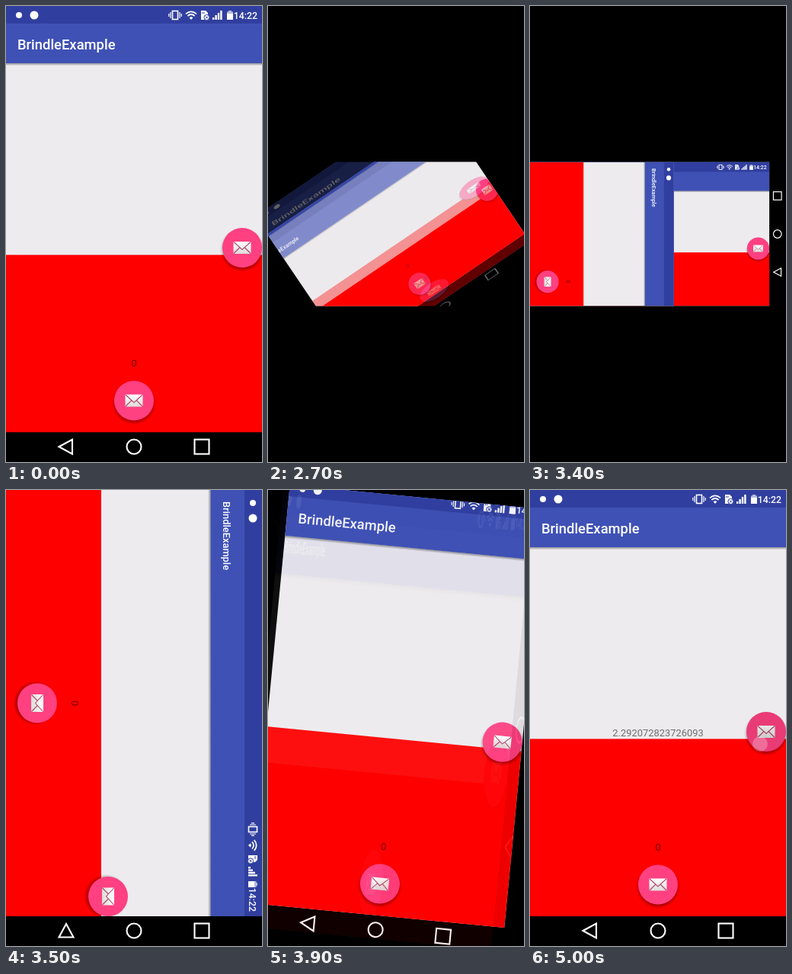
An HTML page that plays this animation: 336x598 px, repeating every 5.1 s.

```html
<!DOCTYPE html>
<html lang="en">
<head>
<meta charset="utf-8">
<title>Screen rotation</title>
<style>
  html, body { margin: 0; width: 100%; height: 100%; overflow: hidden; background: #000; }
  svg { display: block; width: 336px; height: 598px; }
  text { font-family: Roboto, "Noto Sans", sans-serif; }
  .title { font-weight: 500; fill: #fff; }
  .clock { font-weight: 500; font-size: 12.3px; fill: #fff; text-anchor: end; }
  .value { font-size: 12.9px; fill: #000; fill-opacity: .54; text-anchor: middle; }
  .line { fill: none; stroke: #fff; stroke-width: 2.1; }
</style>
</head>
<body>
<svg viewBox="0 0 336 598">
  <defs>
    <clipPath id="window"><rect id="frame" width="336" height="598"/></clipPath>
    <clipPath id="square"><rect width="336" height="336"/></clipPath>
    <clipPath id="hole"><rect id="opening" width="336" height="598"/></clipPath>
    <linearGradient id="edge" x2="0" y2="1">
      <stop stop-opacity=".38"/>
      <stop offset="1" stop-opacity="0"/>
    </linearGradient>
    <radialGradient id="shade">
      <stop offset=".78" stop-opacity=".4"/>
      <stop offset="1" stop-opacity="0"/>
    </radialGradient>
    <linearGradient id="paper" x2="0" y2="1">
      <stop stop-color="#fff"/>
      <stop offset="1" stop-color="#dedbd8"/>
    </linearGradient>

    <g id="fab">
      <circle cy="2.5" r="29" fill="url(#shade)"/>
      <circle r="26" fill="#ff4081"/>
      <rect x="-11.5" y="-8" width="23" height="16" rx="1" fill="url(#paper)"/>
      <path d="M-11-7.5 0 2.5 11-7.5M-11 7.5-3.5 0M11 7.5 3.5 0" fill="none" stroke="#b0486e" stroke-width="1.1"/>
    </g>

    <path id="back" class="line" d="M-9 0 8.5-9.5V9.5Z"/>
    <circle id="home" class="line" r="9.5"/>
    <rect id="recent" class="line" x="-9.5" y="-9.5" width="19" height="19"/>

    <g id="notices" fill="#fff">
      <circle cx="17" cy="12" r="4"/>
      <circle cx="37" cy="12" r="5.5"/>
    </g>

    <g id="system" fill="#fff">
      <rect x="218.5" y="6.5" width="7" height="11" fill="none" stroke="#fff" stroke-width="1.6"/>
      <path d="M216 8v8M213.8 10v4M228 8v8M230.2 10v4" stroke="#fff" stroke-width="1.2"/>
      <g fill="none" stroke="#fff" stroke-width="1.7">
        <path d="M236 10.3q7-6 14 0M238.4 13q4.6-4 9.2 0"/>
      </g>
      <path d="M240.6 15.2q2.4-2 4.8 0L243 18Z"/>
      <path d="M256 6h6l3 3v9h-9Z"/>
      <circle cx="263.5" cy="15" r="3.6" stroke="#303f9f"/>
      <path d="M262 13.5l3 3m0-3l-3 3M258 8v2m2-2v2" stroke="#303f9f"/>
      <path d="M271 18v-3h2.4v3ZM274.4 18v-6h2.4v6ZM277.8 18V9h2.4v9ZM281.2 18V6h2.4v12Z"/>
      <path d="M290 7.5h2V6h4v1.5h2V18h-8Z" fill-opacity=".65"/>
      <path d="M290 10h8v8h-8Z"/>
      <text class="clock" x="330" y="16.6">14:22</text>
    </g>

    <g id="portrait">
      <rect width="336" height="598"/>
      <rect width="336" height="559" fill="#edebee"/>
      <rect y="326.4" width="336" height="232.6" fill="#f00"/>
      <rect width="336" height="75" fill="#3f51b5"/>
      <rect width="336" height="23" fill="#303f9f"/>
      <rect y="75" width="336" height="3.5" fill="url(#edge)"/>
      <use href="#notices"/>
      <use href="#system"/>
      <text class="title" x="15" y="57" font-size="18.4">BrindleExample</text>
      <text class="value" x="168" y="473">0</text>
      <use href="#fab" x="310" y="317"/>
      <use href="#fab" x="168" y="517.5"/>
      <use href="#back" x="78.5" y="578"/>
      <use href="#home" x="168" y="578"/>
      <use href="#recent" x="257" y="578"/>
    </g>

    <g id="landscape">
      <rect width="598" height="336"/>
      <rect width="559" height="336" fill="#edebee"/>
      <rect y="211" width="559" height="125" fill="#f00"/>
      <rect width="559" height="67.5" fill="#3f51b5"/>
      <rect width="559" height="23" fill="#303f9f"/>
      <rect y="67.5" width="559" height="3.5" fill="url(#edge)"/>
      <use href="#notices"/>
      <use href="#system" x="223"/>
      <text class="title" x="15" y="51.5" font-size="12.9">BrindleExample</text>
      <text class="value" x="279.5" y="250">0</text>
      <use href="#fab" x="533" y="202"/>
      <use href="#fab" x="279.5" y="295"/>
      <use href="#recent" x="578" y="79"/>
      <use href="#home" x="578" y="168"/>
      <use href="#back" x="578" y="257"/>
    </g>
  </defs>

  <rect width="336" height="598"/>
  <g id="view" clip-path="url(#window)">
    <g id="inside"><use id="screen" href="#portrait"/></g>
    <g id="cover"><use id="shot" href="#landscape"/></g>
  </g>
  <g id="tap">
    <circle id="press" cx="310" cy="317" r="26"/>
    <circle id="touch" cx="302" cy="333" r="10" fill="#fff"/>
    <text id="result" class="value" x="168" y="322.5">2.292072823726093</text>
  </g>
</svg>
<script>
const LOOP = 5100, STEP = 100, SPIN = 441;
const FIT = 336 / 598;
const modes = {
  portrait: { w: 336, h: 598, project: 'translate(0 0)' },
  landscape: { w: 598, h: 336, project: `translate(0 ${(598 - 336 * FIT) / 2}) scale(${FIT})` }
};
const $ = id => document.getElementById(id);
const set = (id, attrs) => {
  for (const key in attrs) $(id).setAttribute(key, attrs[key]);
};
const clamp = x => Math.min(1, Math.max(0, x));

// cubic-bezier(.4, 0, .2, 1)
function ease(x) {
  if (x <= 0) return 0;
  if (x >= 1) return 1;
  let lo = 0, hi = 1;
  for (let i = 0; i < 24; i++) {
    const s = (lo + hi) / 2, r = 1 - s;
    if (1.2 * s * r * r + .6 * s * s * r + s * s * s < x) lo = s; else hi = s;
  }
  return lo * lo * (3 - 2 * lo);
}

// Places a screen on the centre of a display, turned and stretched.
function place(display, screen, angle, sx = 1, sy = 1) {
  return `translate(${display.w / 2} ${display.h / 2}) rotate(${angle}) ` +
    `scale(${sx} ${sy}) translate(${-screen.w / 2} ${-screen.h / 2})`;
}

// The previous screen fades out over the next one while both turn upright.
// The next one shows only inside the outline of the previous one.
function rotate(from, to, turn, p, handover) {
  const prev = modes[from], next = modes[to];
  const display = handover ? prev : next;
  const angle = turn * (1 - p);
  const outline = place(next, prev, angle,
    1 + (next.w / prev.w - 1) * p, 1 + (next.h / prev.h - 1) * p);
  set('view', { transform: display.project });
  set('frame', { width: display.w, height: display.h });
  set('opening', { width: prev.w, height: prev.h, transform: outline });
  set('inside', { 'clip-path': handover ? 'none' : 'url(#hole)' });
  set('screen', {
    href: '#' + (handover ? from : to),
    transform: place(display, display, handover ? 0 : angle)
  });
  set('cover', { 'clip-path': handover ? 'url(#square)' : 'none', opacity: 1 - p });
  set('shot', { href: '#' + from, transform: outline });
}

function draw(time) {
  const t = Math.floor(time % LOOP / STEP) * STEP;
  if (t < 2300) rotate('landscape', 'portrait', 90, 1);
  else if (t < 3400) rotate('portrait', 'landscape', -90, ease((t - 2522) / SPIN), t < 2400);
  else rotate('landscape', 'portrait', 90, ease((t - 3591) / SPIN), t < 3500);

  const down = clamp((t - 4500) / 300);
  set('press', { opacity: .085 * down });
  set('touch', { opacity: .26 * down });
  set('result', { opacity: t >= 4900 ? 1 : 0 });
}

const start = performance.now();
function tick() {
  draw(performance.now() - start);
  requestAnimationFrame(tick);
}
tick();
</script>
</body>
</html>
```
